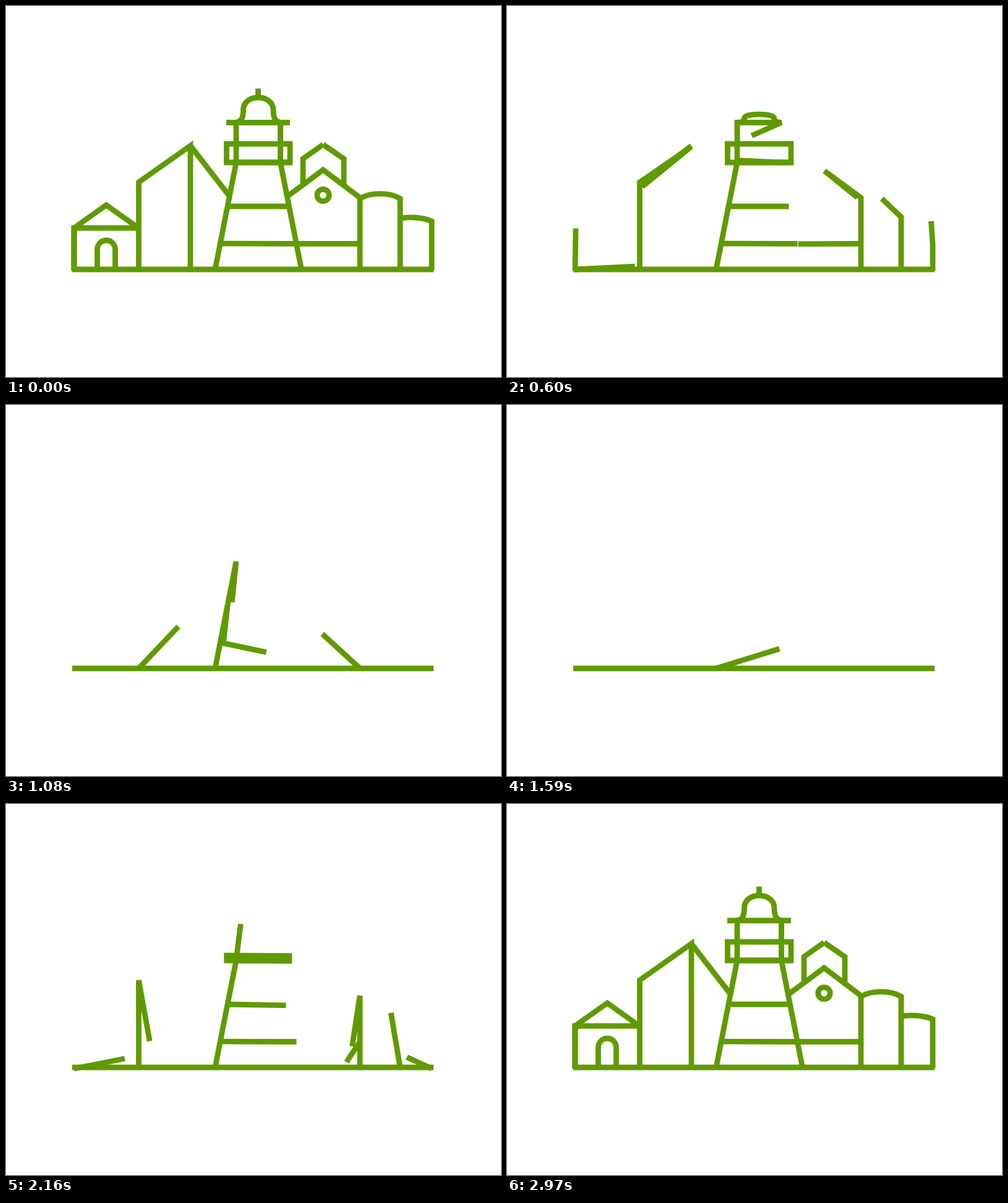
Animation, 800 px wide and 600 px high, one loop 3390 ms. Source, as an HTML page with a canvas:

```html
<!DOCTYPE html>
<html lang="en">
<head>
<meta charset="utf-8">
<title>Folding skyline</title>
<style>
html, body { margin: 0; width: 100%; height: 100%; overflow: hidden; background: #fff; }
canvas { display: block; }
</style>
</head>
<body>
<canvas id="stage" width="800" height="600"></canvas>
<script>
const ctx = document.getElementById('stage').getContext('2d');
const LOOP = 3390, STEP = 30, MIDDLE = 1490, FOLD = 283, GROUND = 426;
let clock = 0; // distance in ms from the fully folded moment

const lerp = (a, b, q) => a + (b - a) * q;
const mix = (a, b, q) => [lerp(a[0], b[0], q), lerp(a[1], b[1], q)];
const progress = (start, duration = FOLD) =>
  Math.max(0, Math.min(1, (clock - start) / duration));

function line(points, closed) {
  ctx.beginPath();
  points.forEach(p => ctx.lineTo(p[0], p[1]));
  if (closed) ctx.closePath();
  ctx.stroke();
}

// Each vertex [x, y, start, duration] swings out from the vertex two before it.
// The first vertex is only an origin and is not drawn.
function fold(...points) {
  const now = points.slice(0, 2);
  for (let i = 2; i < points.length; i++) {
    const q = progress(points[i][2], points[i][3]);
    if (!q) break;
    now.push(mix(now[i - 2], points[i], q));
  }
  if (now.length > 2) line(now.slice(1));
  return now;
}

function house() {
  fold([214, GROUND], [110, GROUND + 2], [110, 359, 610]);
  const beam = progress(969);
  if (beam) line([[110, GROUND + 2], [110, 359], [lerp(110, 214, beam), 359]]);
  fold([214, GROUND], [110, GROUND], [110, 359, 870], [162, 322, 1142, 160], [214, 359, 1300, 160]);

  const door = progress(1022);
  if (!door) return;
  ctx.save();
  ctx.beginPath();
  ctx.rect(140, 360, 45, GROUND - 360);
  ctx.clip();
  ctx.translate(0, 51.5 * (1 - door));
  ctx.beginPath();
  ctx.moveTo(147.5, GROUND);
  ctx.arc(162, 393.5, 14.5, Math.PI, 0);
  ctx.lineTo(176.5, GROUND);
  ctx.stroke();
  ctx.restore();
}

function tallBuilding() {
  fold([338, GROUND], [214.5, GROUND], [214.5, 285, 274], [298, 226, 610], [298, GROUND, 876]);
  fold([214.5, 285], [298, 226], [360, 306, 876]);
}

function lighthouse() {
  const foot = [338, GROUND], shoulder = [372, 253];
  const leg = fold([477.5, GROUND], foot, [358, 324, 12], [...shoulder, 107]);
  const knee = mix(foot, leg[2] || foot, 0.41);
  fold(foot, knee, [469.5, 384.5, 232]);
  fold([346, 384.5], [358, 324], [455.5, 324, 395]);

  const floor = fold([358, 324], shoulder, [459, 253, 390]);
  const tip = floor[2] || [358, 324];
  const rise = 30 * progress(594);
  if (rise) {
    const left = lerp(372, 356.5, progress(390));
    line([[left, 253], tip, [tip[0], tip[1] - rise], [left, 253 - rise]], true);
  }
  fold(tip, shoulder, [372, 188.5, 411], [443.5, 188.5, 680, 200],
    [443.5, 253, 808, 250], [477.5, GROUND, 1082]);
  fold(shoulder, [443.5, 253], [443.5, 188.5, 876]);

  const eaves = progress(890, 170);
  if (eaves) line([[lerp(372, 356, eaves), 188.5], [lerp(443.5, 459, eaves), 188.5]]);
  dome(progress(808, 250));

  const mast = progress(1040, 160);
  if (mast) line([[407.5, 148], [407.5, lerp(148, 133.5, mast)]]);
}

function dome(scale) {
  if (!scale) return;
  const y = v => 188.5 - scale * (188.5 - v);
  ctx.beginPath();
  ctx.moveTo(372, y(188));
  ctx.bezierCurveTo(381, y(188), 383.5, y(179), 383.5, y(168));
  ctx.bezierCurveTo(383.5, y(156), 394, y(148), 407.5, y(148));
  ctx.bezierCurveTo(421, y(148), 432, y(156), 432, y(168));
  ctx.bezierCurveTo(432, y(179), 434.5, y(188), 443.5, y(188));
  ctx.stroke();
}

function church() {
  fold([455, GROUND], [572, GROUND], [572, 310, 274], [512.5, 265, 610], [456, 307, 876]);
  fold([572, GROUND], [572, 384.5], [469.5, 384.5, 610]);
  for (const x of [480, 546]) {
    fold([512.5, 265], [x, 291], [x, 247, 1159, 150], [512.5, 224, 1305, 155]);
  }
  const q = progress(916);
  if (!q) return;
  ctx.beginPath();
  ctx.arc(512.5, lerp(265, 306, q), 9.7 * Math.min(1, 2 * q), 0, 2 * Math.PI);
  ctx.stroke();
}

function silo(x, top, inner, innerTop, bottom, wallStart, roofStart, bulge) {
  const wall = progress(wallStart), roof = progress(roofStart), bend = progress(1159);
  if (!wall) return;
  const base = [x, bottom];
  let tip = mix([inner, GROUND], [x, top], wall);
  let corner = mix(base, tip, 0.5);
  if (roof) {
    corner = [x, lerp((top + GROUND) / 2, top, roof)];
    tip = mix([x, top], [inner, lerp(top, innerTop, bend)], roof);
  }
  const a = mix(corner, tip, 0.25), b = mix(corner, tip, 0.75), lift = bulge * bend;
  ctx.beginPath();
  ctx.moveTo(...base);
  ctx.lineTo(...corner);
  ctx.bezierCurveTo(a[0], a[1] - lift, b[0], b[1] - lift, ...tip);
  ctx.stroke();
}

function draw(now) {
  const time = Math.floor((now % LOOP) / STEP) * STEP;
  clock = Math.abs(time - MIDDLE);
  ctx.fillStyle = '#fff';
  ctx.fillRect(0, 0, 800, 600);
  ctx.strokeStyle = '#609a00';
  ctx.lineWidth = 8.8;
  ctx.miterLimit = 4;
  line([[107, GROUND], [691, GROUND]]);
  house();
  tallBuilding();
  lighthouse();
  church();
  silo(637, 311.5, 572, 311.5, GROUND, 452, 754, 10.5);
  silo(688, 348, 637, 344, GROUND + 2, 610, 876, 5);
}

const begin = performance.now();
function frame() {
  draw(performance.now() - begin);
  requestAnimationFrame(frame);
}
frame();
</script>
</body>
</html>
```
